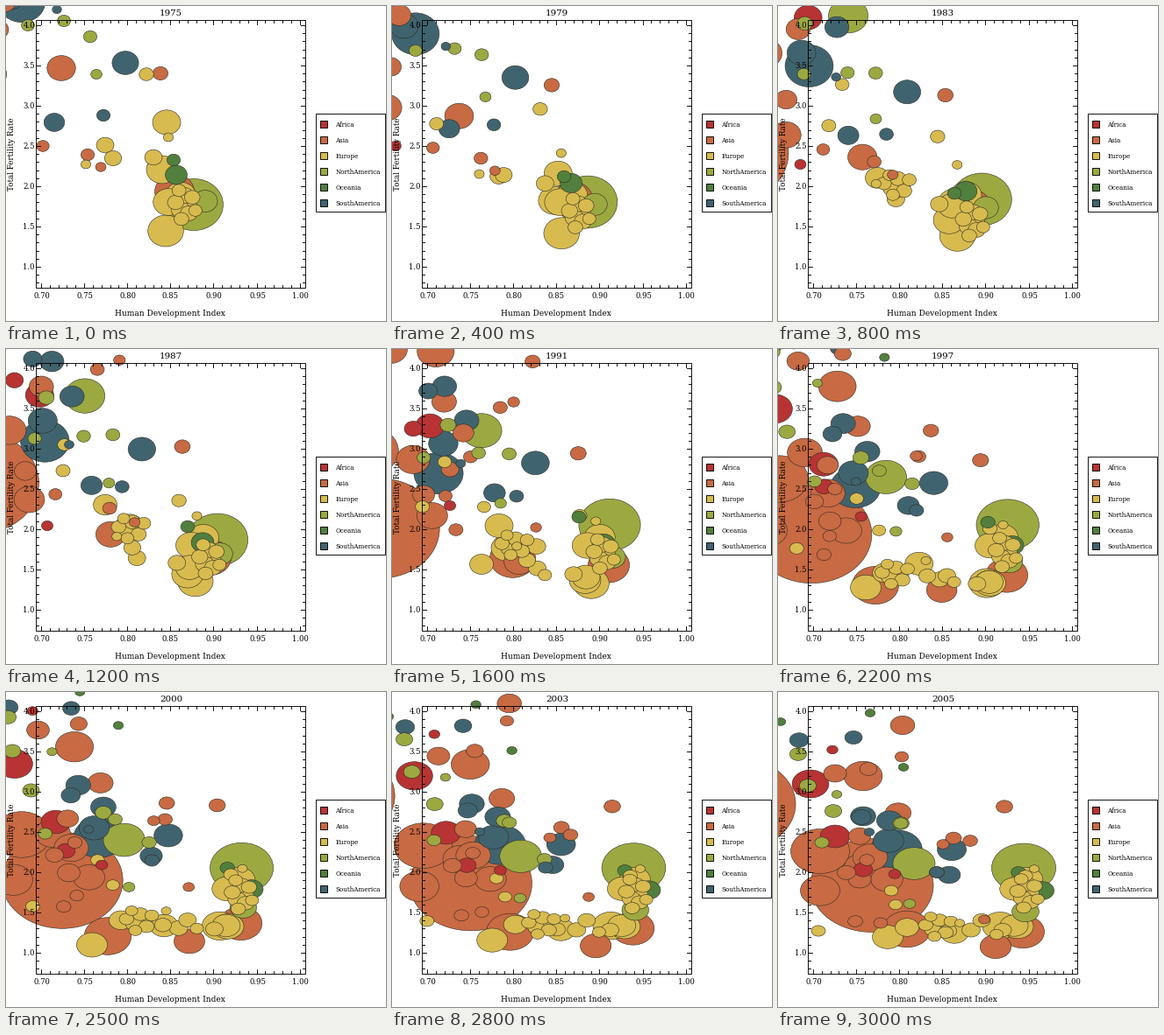
Recreate the animation shown at these times as a matplotlib script. Size 433 by 360 pixels, loop 3.1 s.

```python
import numpy as np
import matplotlib.pyplot as plt
from matplotlib.animation import FuncAnimation
from matplotlib.patches import Ellipse, Rectangle

W, H, DPI = 433, 360, 72
FRAMES, STEP_MS, FIRST_YEAR = 31, 100, 1975
LAST = FRAMES - 1
LEFT, RIGHT, TOP, BOTTOM = 34, 341, 16, 322
GROWTH = 0.003  # yearly radius growth outside Europe

AF, AS, EU = "#b83333", "#c86a43", "#d8bb4f"
NA, OC, SA = "#9ca941", "#517f3d", "#40646f"

plt.rcParams["font.family"] = "DejaVu Serif"
fig = plt.figure(figsize=(W / DPI, H / DPI), dpi=DPI, facecolor="white")
ax = fig.add_axes([0, 0, 1, 1])
ax.set_xlim(0, W)
ax.set_ylim(H, 0)
ax.axis("off")

bubbles = []


def add(colour, r, first, move):
    patch = Ellipse((0, 0), 1, 1, facecolor=colour, edgecolor="#2b2b22",
                    linewidth=0.55)
    ax.add_patch(patch)
    bubbles.append((patch, r, 0 if colour == EU else GROWTH, first, move))


def glide(colour, r, start, end, first=0, bend=1.0):
    """Development speeds up slowly; fertility falls along an ease-out."""
    def move(t):
        u = max(0, (t - first) / (LAST - first))
        return (start[0] + (end[0] - start[0]) * u ** 1.3,
                start[1] + (end[1] - start[1]) * (1 - (1 - u) ** bend))
    add(colour, r, first, move)


def route(colour, r, *keys, shift=(0, 0)):
    """Straight legs between (year, x, y) turning points."""
    years, xs, ys = zip(*keys)
    add(colour, r, years[0],
        lambda t: (np.interp(t, years, xs) + shift[0],
                   np.interp(t, years, ys) + shift[1]))


def swarm(colour, radii, spread, *keys):
    """Bubbles on a sunflower spiral that share one route."""
    n = len(radii)
    for k, r in enumerate(radii):
        d, a = np.sqrt((k + 0.5) / n), 2.4 * k
        route(colour, r, *keys,
              shift=(spread[0] * d * np.cos(a), spread[1] * d * np.sin(a)))


# Asia
route(AS, 67, (6, -66, 175), (12, -29, 153), (16, -13, 205), (30, 107, 221))
route(AS, 26, (15, 148, 232), (19, 106, 261), (25, 116, 279), (30, 147, 271))
route(AS, 23.5, (0, 192, 212), (16, 247, 247), (30, 279, 274))
route(AS, 8, (0, 93, 170), (12, 118, 182), (19, 39, 225), (30, 88, 262))
route(AS, 7.5, (0, 42, 160), (16, 61, 168), (19, 37, 195), (30, 117, 264))
swarm(AS, np.linspace(8, 12, 3), (25, 30), (15, 92, 115), (19, 41, 148), (30, 91, 192))
glide(AS, 68, (-85, 105), (-51, 128), 25)
glide(AS, 32, (-30, 105), (48, 182), 14, 1.2)
glide(AS, 21.5, (-25, 200), (48, 227), 19)
glide(AS, 21, (42, -24), (97, 96), 12)
glide(AS, 19.5, (-2, 0), (96, 200), 16, 1.6)
glide(AS, 19, (-40, -40), (105, 189), bend=1.7)
glide(AS, 17.5, (-16, 78), (124, 214), bend=2.3)
glide(AS, 17, (63, 71), (248, 291), bend=2)
glide(AS, 14, (-2, -5), (137, 138), bend=0.8)
glide(AS, 12.5, (-9, 27), (93, 214), bend=1.8)
glide(AS, 9, (176, 77), (258, 131), bend=2)
glide(AS, 6.2, (108, 184), (235, 260), bend=0.4)
glide(AS, 8, (98, 0), (219, 170), 10, 1.4)
glide(AS, 6.7, (128, 0), (188, 174), 11, 1.4)
glide(AS, 8.6, (159, 0), (200, 167), 15, 1.3)
glide(AS, 12.5, (17, -6), (65, 93), 20)
glide(AS, 9.4, (72, -5), (103, 88), 21)
glide(AS, 13.3, (128, -12), (142, 38), 26)
glide(AS, 7.3, (124, -8), (141, 74), 26)

# Europe
route(EU, 20.3, (0, 182, 257), (16, 227, 268), (30, 253, 267))
route(EU, 17.5, (15, 140, 218), (19, 102, 256), (25, 98, 289), (30, 125, 280))
route(EU, 16, (10, 150, 203), (16, 122, 202), (25, 180, 267), (30, 201, 275))
route(EU, 13.5, (5, 113, 210), (12, 113, 178), (16, 102, 246), (30, 147, 269))
route(EU, 8, (3, 49, 134), (12, 65, 139), (19, 12, 211), (30, 46, 273))
route(EU, 7.8, (5, 78, 75), (16, 60, 129), (30, 129, 227))
swarm(EU, np.linspace(11, 7.5, 9), (14, 20),
      (0, 203, 227), (8, 221, 246), (16, 240, 234), (30, 283, 230))
swarm(EU, np.linspace(10, 7, 8), (20, 13),
      (5, 130, 204), (12, 143, 205), (16, 140, 224), (19, 115, 253), (30, 183, 268))
glide(EU, 18, (178, 187), (273, 268), bend=4)
glide(EU, 16, (183, 133), (269, 267), bend=4)
glide(EU, 17.7, (199, 217), (284, 214))
glide(EU, 17.3, (185, 224), (270, 225))
glide(EU, 8.2, (160, 78), (282, 210), bend=2.5)
glide(EU, 5.6, (185, 150), (292, 202), bend=3)
glide(EU, 10, (168, 173), (256, 272), bend=2.5)
glide(EU, 10, (113, 159), (232, 261), bend=3)
glide(EU, 9.7, (122, 174), (194, 273), bend=1.5)
glide(EU, 5.6, (91, 181), (207, 264))
glide(EU, 10.5, (163, 215), (220, 272), 15, 3)
glide(EU, 7.6, (172, 257), (249, 277), 15)
glide(EU, 7.5, (104, 176), (134, 243), 15)

# North America
route(NA, 35, (0, 214, 227), (12, 241, 218), (16, 248, 201), (30, 280, 201))
glide(NA, 23, (77, -11), (155, 196), 6, 1.3)
glide(NA, 14.7, (227, 223), (282, 251))
glide(NA, 8, (96, 35), (181, 206), bend=0.9)
glide(NA, 7.8, (66, 17), (140, 150), bend=1.9)
glide(NA, 6.6, (103, 78), (150, 242), bend=1.2)
glide(NA, 7.7, (25, 22), (50, 172), bend=1.5)
glide(NA, 9, (20, -20), (140, 150), 4, 1.6)
glide(NA, 9.2, (-16, 55), (63, 136), 16, 1.2)
glide(NA, 9.2, (-9, -5), (23, 71), 21)
glide(NA, 9.2, (-11, 28), (34, 107), 20)
glide(NA, 5.5, (38, 0), (67, 117), 18)

# South America
route(SA, 28, (0, 18, -5), (16, 53, 142), (30, 135, 180))
glide(SA, 16.7, (5, -10), (126, 170), bend=1.4)
glide(SA, 15.8, (136, 65), (198, 180), bend=1.1)
glide(SA, 14, (63, 0), (127, 147), 5, 1.4)
glide(SA, 12.3, (55, 133), (195, 209), bend=0.7)
glide(SA, 8, (111, 125), (181, 206))
glide(SA, 5.5, (58, 4), (104, 160), bend=2.2)
glide(SA, 13.7, (50, 0), (97, 142), 10)
glide(SA, 10.6, (27, -8), (95, 143), 10, 1.3)
glide(SA, 9.5, (68, -8), (86, 52), 21)
glide(SA, 10.3, (-5, -5), (24, 55), 22)

# Africa
route(AF, 6.6, (4, 4, 160), (12, 47, 202), (16, 66, 179), (30, 133, 208))
glide(AF, 16.2, (33, -8), (65, 165), 6, 1.5)
glide(AF, 10.2, (5, 5), (97, 203), 10, 1.6)
glide(AF, 20, (-17, 50), (37, 105), 18)
glide(AF, 6, (18, -5), (62, 66), 22)

# Oceania
route(OC, 13, (0, 194, 193), (12, 224, 221), (30, 301, 227))
route(OC, 8, (0, 191, 176), (8, 201, 214), (16, 213, 192), (30, 274, 206))
glide(OC, 5.5, (82, -5), (105, 24), 24)
glide(OC, 5.5, (120, 0), (143, 86), 21)
glide(OC, 5.5, (-4, 28), (3, 34), 28)


def label(x, y, text, size, **kw):
    kw = {"ha": "center", "va": "center", "zorder": 6, **kw}
    return ax.text(x, y, text, fontsize=size, color="black", **kw)


def line(xs, ys):
    ax.plot(xs, ys, color="black", lw=0.9, zorder=5)


def box(x, y, w, h, fill):
    ax.add_patch(Rectangle((x, y), w, h, facecolor=fill, edgecolor="black",
                           linewidth=0.9, zorder=5))


box(LEFT, TOP, RIGHT - LEFT, BOTTOM - TOP, "none")

for i in range(31):
    x = round(40 + i * 9.82)
    size = 3 if i % 5 else 5
    line([x, x], [BOTTOM, BOTTOM - size])
    line([x, x], [TOP, TOP + size])
    if i % 5 == 0:
        label(x + 0.5, 332, f"{0.7 + i / 100:.2f}", 8.5)

for i in range(-2, 31):
    y = round(298 - i * 9.2)
    size = 3 if i % 5 else 5
    line([LEFT, LEFT + size], [y, y])
    line([RIGHT, RIGHT - size], [y, y])
    if i % 5 == 0:
        label(33, y + 0.5, f"{1 + i / 10:.1f}", 8.5, ha="right")

label(187, 351, "Human Development Index", 9)
label(6.5, 169, "Total Fertility Rate", 8.7, rotation=90)
title = label(188, 8.5, str(FIRST_YEAR), 10.2)

box(353, 123, 79, 112, "white")
legend = [("Africa", AF), ("Asia", AS), ("Europe", EU),
          ("NorthAmerica", NA), ("Oceania", OC), ("SouthAmerica", SA)]
for i, (name, colour) in enumerate(legend):
    y = 135 + 18 * i
    box(358, y - 4, 8, 8, colour)
    label(375.5, y, name, 7.1, ha="left", va="center_baseline")


def update(t):
    aspect = 1.13 + 0.18 * (t / LAST) ** 2
    for patch, mean_r, growth, first, move in bubbles:
        r = mean_r * (1 + growth * (t - LAST / 2))
        patch.set_visible(t >= first)
        patch.set_center(move(t))
        patch.set_width(2 * r)
        patch.set_height(2 * r / aspect)
        patch.set_zorder(2 - r / 100)  # small bubbles stay in front
    title.set_text(str(FIRST_YEAR + t))
    return [title]


anim = FuncAnimation(fig, update, frames=FRAMES, interval=STEP_MS,
                     repeat=True, repeat_delay=0, blit=False)
plt.show()
```
